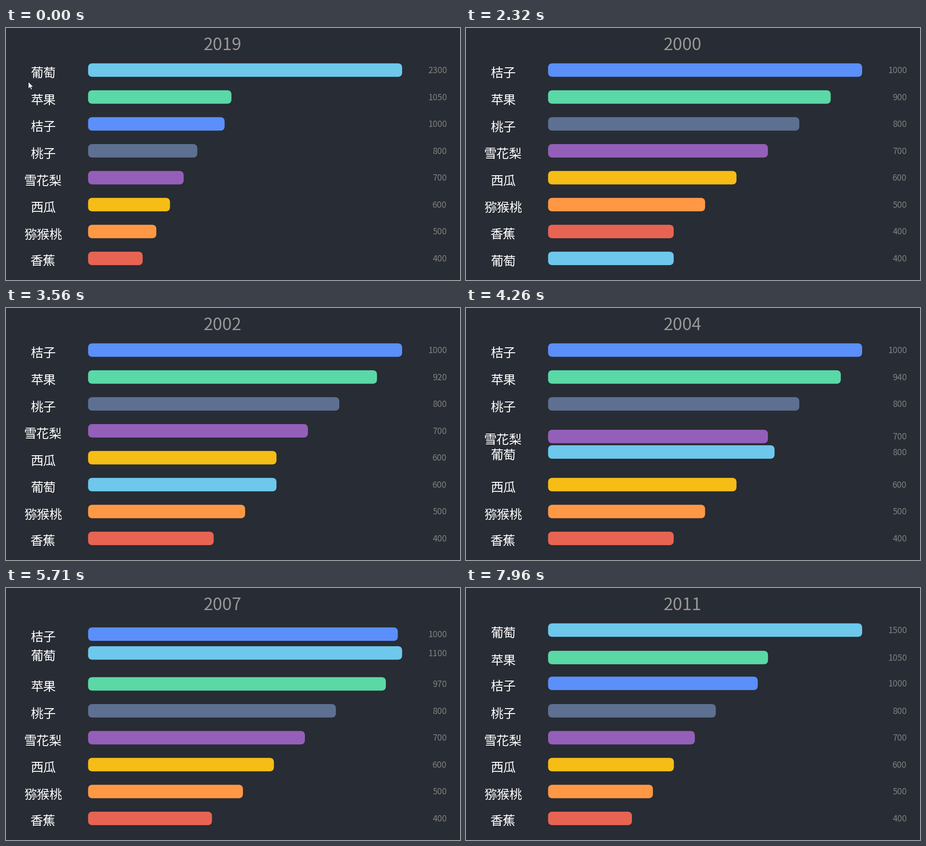
These frames come from a looping animation (1004x558 px, 8000 ms). A matplotlib script:

```python
import math

import matplotlib.pyplot as plt
from matplotlib.animation import FuncAnimation
from matplotlib.patches import FancyBboxPatch, Polygon

W, H, DPI = 1004, 558, 64
LOOP, STEP = 8000, 20

# Times in ms
RESET = 2320          # the count restarts at 2000
FIRST_YEAR = 2690     # switch to 2001
YEAR = 495
SLIDE = 328
TICK = 77.1           # pictures are held this long

# Layout in pixels
BAR_X, BAR_FULL, BAR_H = 181.5, 694.5, 29.8
TOP, PITCH = 78.3, 59.57

FONT = "Noto Sans CJK JP"
FRUITS = [
    ("桔子", 1000, "#5B8FF9"),
    ("苹果", 900, "#5AD8A6"),
    ("桃子", 800, "#5D7092"),
    ("雪花梨", 700, "#945FB9"),
    ("西瓜", 600, "#F6BD16"),
    ("猕猴桃", 500, "#FF9845"),
    ("香蕉", 400, "#E86452"),
    ("葡萄", 400, "#6DC8EC"),
]
APPLE, GRAPE = 1, 7

# Pointer stops: from, to, x, y
POINTER = [
    (0, 71, 49.5, 119), (71, 121, 70, 133), (121, 171, 108, 86),
    (4470, 4550, 980, 484), (4550, 4630, 990, 512),
    (4630, 4710, 988, 532), (4710, 4785, 981, 544),
    (4785, 4860, 975, 551),
]
ARROW = [(0, 0), (0, 15.5), (3.6, 12.2), (6, 17.5), (8.3, 16.5),
         (6, 11.3), (10.8, 11.3)]


def values(n):
    """Amounts n years after 2000."""
    out = [amount for _, amount, _ in FRUITS]
    out[APPLE] = 900 + 10 * n if n <= 10 else 1050
    out[GRAPE] = 400 + 100 * n
    return out


def layout(n):
    """Bar tops and widths n years after 2000; ties keep the list order."""
    vals = values(n)
    order = sorted(range(len(vals)), key=lambda i: -vals[i])
    tops = [TOP + PITCH * order.index(i) for i in range(len(vals))]
    widths = [BAR_FULL * v / max(vals) for v in vals]
    return tops, widths


LAYOUTS = [layout(n) for n in range(20)]


def mix(a, b, p):
    return [u + (v - u) * p for u, v in zip(a, b)]


def held(t):
    base = 2333 if t > 6110 else 2317
    return base + TICK * math.floor((t - base) / TICK)


def state(t):
    """Year index, bar tops and bar widths at time t."""
    if t < RESET:
        return 19, *LAYOUTS[19]
    t = held(t)
    n = max(0, math.floor((t - FIRST_YEAR) / YEAR) + 1)
    if n == 0:
        return 0, *LAYOUTS[0]
    p = min(1, (t - FIRST_YEAR - (n - 1) * YEAR) / SLIDE)
    (tops0, widths0), (tops1, widths1) = LAYOUTS[n - 1], LAYOUTS[n]
    return n, mix(tops0, tops1, p), mix(widths0, widths1, p)


fig = plt.figure(figsize=(W / DPI, H / DPI), dpi=DPI, facecolor="#282C34")
ax = fig.add_axes([0, 0, 1, 1])
ax.set_xlim(0, W)
ax.set_ylim(H, 0)
ax.axis("off")


def label(x, y, text, px, color, ha):
    return ax.text(x, y, text, fontsize=px * 72 / DPI, color=color, ha=ha,
                   va="baseline", family=FONT, zorder=20)


title = label(479, 49, "", 38, "#969696", "center")
bars, names, amounts = [], [], []
for i, (name, _, color) in enumerate(FRUITS):
    bar = FancyBboxPatch((BAR_X, TOP), BAR_FULL, BAR_H, lw=0, fc=color,
                         boxstyle="round,pad=0,rounding_size=9.5",
                         zorder=i + 1)
    bars.append(ax.add_patch(bar))
    names.append(label(82, 0, name, 28, "white", "center"))
    amounts.append(label(975, 0, "", 19, "#808080", "right"))

pointer = ax.add_patch(Polygon(ARROW, fc="white", ec="#15171B", lw=0.9,
                               zorder=30))


def update(k):
    t = k * STEP + STEP / 2
    n, tops, widths = state(t)
    title.set_text(str(2000 + n))
    rows = zip(bars, names, amounts, tops, widths, values(n))
    for bar, name, amount, top, width, value in rows:
        bar.set_y(top)
        bar.set_width(width)
        name.set_y(top + 31)
        amount.set_y(top + 21.7)
        amount.set_text(str(value))

    spot = next(((x, y) for a, b, x, y in POINTER if a <= t < b), None)
    pointer.set_visible(spot is not None)
    if spot:
        pointer.set_xy([(spot[0] + x, spot[1] + y) for x, y in ARROW])
    return [title, pointer, *bars, *names, *amounts]


anim = FuncAnimation(fig, update, frames=LOOP // STEP, interval=STEP,
                     repeat=True, repeat_delay=0, blit=False)
plt.show()
```
